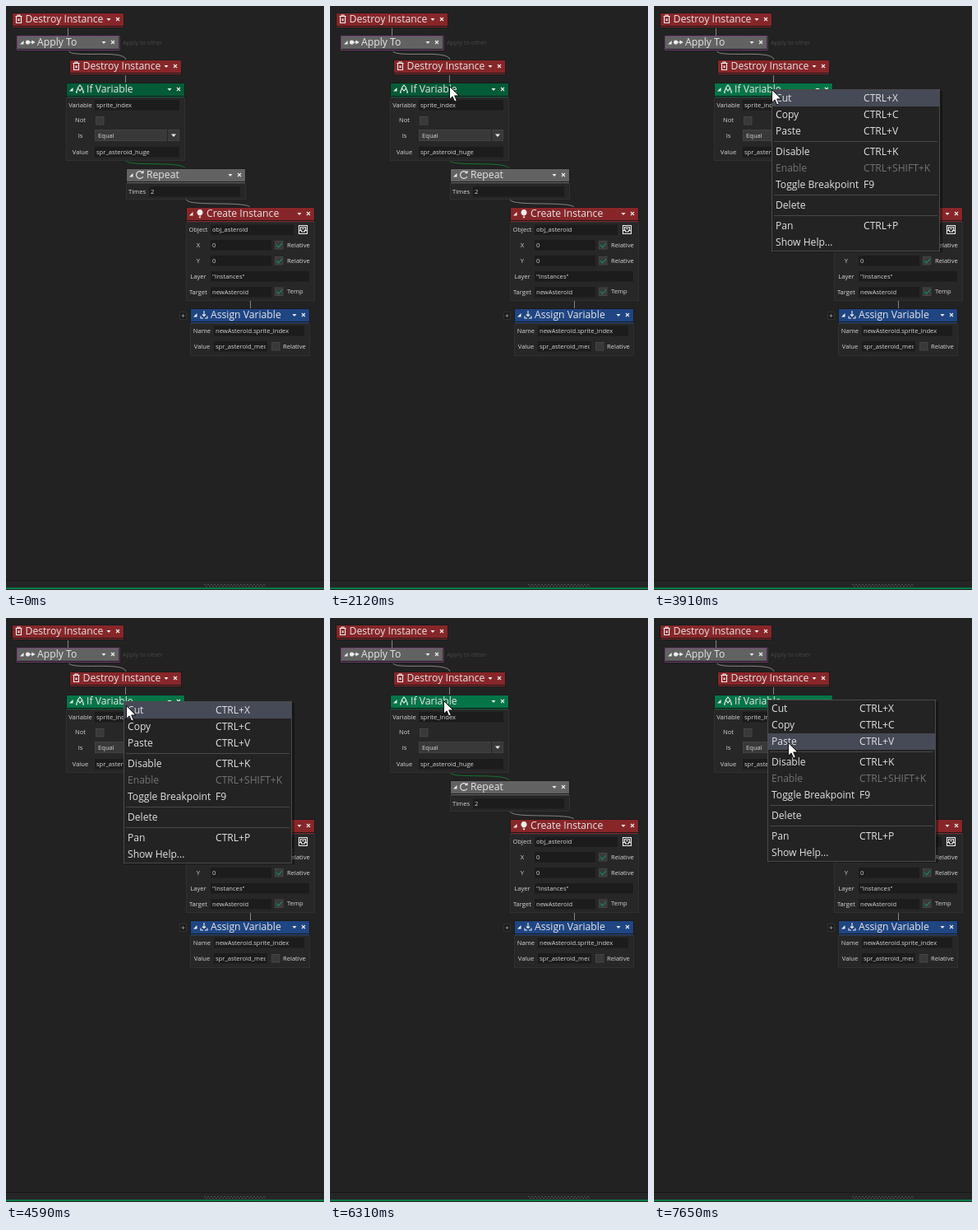
Recreate the animation shown at these times as an HTML page. Size 387 by 709 pixels, loop 8 s.

```html
<!DOCTYPE html>
<html lang="en">
<head>
<meta charset="utf-8">
<title>Visual script editor</title>
<style>
html, body { margin: 0; width: 100%; height: 100%; overflow: hidden; background: #222; }
#stage { display: block; width: 387px; height: 709px; font-family: "Open Sans", "Noto Sans", sans-serif; cursor: default; }
text { white-space: pre; }
.title { font-size: 12.2px; fill: #e6e6e6; }
.small { font-size: 7.6px; fill: #d6d6d6; }
.mid { text-anchor: middle; }
.note { font-size: 7.3px; fill: #484848; }
.item { font-size: 12.1px; fill: #e2e2e2; }
.off { fill: #737373; }
.wire { fill: none; stroke: #858585; }
.icon { fill: none; stroke: #eee; stroke-width: 1.1; }
.solid { fill: #eee; }
</style>
</head>
<body>
<svg id="stage" viewBox="0 0 387 709">
  <rect width="387" height="709" fill="#222"/>
  <g id="graph"></g>
  <rect y="697" width="387" height="12" fill="#252525"/>
  <path d="M0 697.5H387" stroke="#181818"/>
  <path d="M241 702.5H316M243 704.5H316" stroke="#505050" stroke-dasharray="2 2"/>
  <rect y="706" width="387" height="2" fill="#087b46"/>
  <g id="menu" visibility="hidden">
    <rect x="2" y="2" width="206" height="196" fill="#000" opacity=".35"/>
    <rect x=".5" y=".5" width="204" height="196" fill="#232323" stroke="#4b4b4b"/>
    <rect id="hot" x="1" width="203" height="20" fill="#464a56"/>
  </g>
  <g id="pointer" visibility="hidden">
    <path id="arrow" d="M.5 .5V16.2L4.1 12.9L6.7 19L9.3 17.9L6.7 11.9H12Z" fill="#fff" stroke="#000" stroke-width=".9"/>
    <path id="beam" d="M-3 -8H-1L0 -7L1 -8H3M0 -7V7M-3 8H-1L0 7L1 8H3" fill="none" stroke="#ddd" stroke-width="1.1"/>
  </g>
</svg>
<script>
const $ = id => document.getElementById(id);
const RED = '#872629', GREY = '#626262', GREEN = '#045c37', GREEN_LIT = '#057547', BLUE = '#1f4583';

const rect = (x, y, w, h, fill, extra = '') =>
  `<rect x="${x}" y="${y}" width="${w}" height="${h}" fill="${fill}" ${extra}/>`;
const text = (x, y, str, cls) => `<text x="${x}" y="${y}" class="${cls}">${str}</text>`;
const path = (d, cls, extra = '') => `<path d="${d}" class="${cls}" ${extra}/>`;

const icons = {
  trash: 'M-4 -3.5H4M-1.5 -3.5V-5H1.5V-3.5M-3 -3V4.5H3V-3M-1 -.5L1 2M1 -.5L-1 2',
  apply: 'M-5.5 0a2 2 0 1 0 4 0a2 2 0 1 0 -4 0M-1 0H2M2 -1.5V1.5L4.5 0Z',
  branch: 'M0 -5L2.7 -1.5L0 2L-2.7 -1.5ZM-2.5 -1L-4.5 3.5M2.5 -1L4.5 3.5M-5 4H-3M3 4H5',
  loop: 'M3.2 -3A4.4 4.4 0 1 0 3.8 2.2M4 -5V-2.3H1.3',
  bulb: 'M-1.4 1.5C-4.5 -1 -2.5 -4.5 0 -4.5S4.5 -1 1.4 1.5ZM-1.3 3H1.3M-1 4.6H1',
  assign: 'M0 -5V1.5M-2 -.5L0 1.5L2 -.5M-4 1.5V4H-1M4 1.5V4H1'
};

// x, y, w and bottom bound the dark frame; the coloured header sits one pixel inside
function node(x, y, w, bottom, color, icon, name, id = '') {
  const fold = icon !== 'trash';
  const mid = y + 8, end = x + w, ix = x + (fold ? 17 : 8.5);
  let s = rect(x, y, w, 19, '#1b1b1b');
  if (bottom > y + 20)
    s += rect(x + .5, y + 18.5, w - 1, bottom - y - 18, '#272727', 'stroke="#303030"');
  s += rect(x + 1, y + 1, w - 2, 15, color, id && `id="${id}"`) + rect(x + 1, y + 17, w - 2, 1, color);
  if (fold) s += path(`M${x + 4} ${mid + 2.5}h4.5v-4.5z`, 'solid');
  const filled = icon === 'bulb' || icon === 'apply' ? ' solid' : '';
  s += `<g transform="translate(${ix} ${mid})" class="icon">` + path(icons[icon], filled) + '</g>';
  s += text(x + (fold ? 25 : 16.5), y + 12, name, 'title');
  s += path(`M${end - 21.5} ${mid - 1}h5l-2.5 3z`, 'solid');
  return s + path(`M${end - 10} ${mid - 2}l4 4m0 -4l-4 4`, 'icon');
}

const label = (x, y, str) => text(x, y + 2.8, str, 'small mid');
const field = (x, y, w, str) => rect(x, y - 6, w, 12.5, '#1c1c1c') +
  `<svg x="${x}" y="${y - 7}" width="${w - 2}" height="14">${text(2, 9.8, str, 'small')}</svg>`;
function check(x, y, str, on) {
  let s = rect(x + .5, y - 4.5, 9.5, 9.5, '#393939', 'stroke="#454545"');
  if (on) s += path(`M${x + 2} ${y}l2.5 3l4.5 -5`, 'icon', 'style="stroke:#0b9a64"');
  return s + text(x + (on ? 15 : 14), y + 2.8, str, 'small');
}

$('graph').innerHTML = [
  path('M75.5 26V36M145.5 83V94M297.5 358V367', 'wire'),
  path('M76 54C78 64 143 52 146 65', 'wire'),
  path('M146 188C150 195 214 188 218 197', 'wire', 'style="stroke:#16752f"'),
  path('M219 235C223 244 294 236 298 245', 'wire'),

  node(7, 8, 137, 26, RED, 'trash', 'Destroy Instance'),
  node(13, 36, 125, 54, GREY, 'apply', 'Apply To'),
  path('M13.5 53.5V36.5H138V53.5Z', 'wire', 'style="stroke:#743f76"'),
  text(142, 47, 'Apply to other', 'note'),
  node(77, 65, 137, 83, RED, 'trash', 'Destroy Instance'),

  node(73, 93, 145, 187, GREEN, 'branch', 'If Variable', 'head'),
  label(90.5, 120, 'Variable'), field(108, 120, 103, 'sprite_index'),
  label(90.5, 138.5, 'Not'), check(109, 139, '', false),
  label(90.5, 157, 'Is'), rect(108.5, 150.5, 102, 13, '#393939', 'stroke="#424242"'),
  path('M196.5 150V164', 'wire', 'style="stroke:#262626"'),
  path('M201 155.5h6l-3 3.5z', 'solid'), text(112, 159.8, 'Equal', 'small'),
  label(90.5, 177, 'Value'), field(108, 177, 103, 'spr_asteroid_huge'),

  node(146, 197, 146, 234, GREY, 'loop', 'Repeat'),
  label(159.5, 225, 'Times'), field(174, 225, 111, '2'),

  node(219, 244, 157, 357, RED, 'bulb', 'Create Instance'),
  label(234, 271.5, 'Object'), field(249, 271.5, 101, 'obj_asteroid'),
  path('M356.5 266.5h10v10h-10zM358.5 272.5v-4h6v4M357 272.5h2.5v1.5h4v-1.5h2.5M360 270.5h3', 'icon'),
  label(234, 290, 'X'), field(249, 290, 74, '0'), check(327, 290, 'Relative', true),
  label(234, 309, 'Y'), field(249, 309, 74, '0'), check(327, 309, 'Relative', true),
  label(234, 328, 'Layer'), field(249, 328, 120, '"Instances"'),
  label(234, 347, 'Target'), field(249, 347, 74, 'newAsteroid'), check(327, 346.5, 'Temp', true),

  node(224, 367, 146, 424, BLUE, 'assign', 'Assign Variable'),
  rect(211.5, 371.5, 8, 9, '#1b1b1b', 'rx="1.5" stroke="#333"'),
  path('M213.5 376h4m-2 -2v4', 'wire'),
  label(238.5, 394, 'Name'), field(253, 394, 110, 'newAsteroid.sprite_index'),
  label(238.5, 413, 'Value'), field(253, 413, 65, 'spr_asteroid_medium'), check(323, 413, 'Relative', false)
].join('');

const items = [
  [10, 'Cut', 'CTRL+X'], [30, 'Copy', 'CTRL+C'], [50, 'Paste', 'CTRL+V'],
  [75, 'Disable', 'CTRL+K'], [95, 'Enable', 'CTRL+SHIFT+K', 'off'], [115, 'Toggle Breakpoint', 'F9'],
  [140, 'Delete', ''], [165, 'Pan', 'CTRL+P'], [185, 'Show Help...', '']
];
$('menu').insertAdjacentHTML('beforeend',
  path('M3 63.5H202M3 128.5H202M3 153.5H202', 'wire', 'style="stroke:#484848"') +
  items.map(([y, name, keys, cls = '']) =>
    text(5, y + 4.5, name, 'item ' + cls) + text(112, y + 4.5, keys, 'item ' + cls)).join(''));

// Pointer stops after it has reached the node header: time, x, y
const stops = [
  [2120, 145, 97], [2270, 144, 98], [2790, 143, 100], [2880, 143, 101],
  [4590, 146, 106], [4680, 154, 118], [4770, 161, 126],
  [5860, 156, 121], [5940, 148, 114], [6130, 146, 111], [6220, 141, 104], [6310, 138, 100]
];
const bezier = (a, b, c, u) => a * (1 - u) ** 2 + 2 * b * u * (1 - u) + c * u * u;

function pointerAt(t) {
  if (t < 2120) {
    const u = Math.min(9, Math.floor((t - 1240) / 87.5)) / 9;
    return [bezier(136, -40, 143, u), bezier(670, 500, 100, u)];
  }
  if (t >= 7140) {
    const u = Math.min(7, Math.floor((t - 7140) / 85) + 1) / 7;
    const e = u * u * (3 - 2 * u);
    return [138 + 25 * e, 100 + 51 * e];
  }
  return stops.filter(s => s[0] <= t).pop().slice(1);
}

const show = (id, on) => $(id).setAttribute('visibility', on ? 'visible' : 'hidden');

function draw(t) {
  const [x, y] = pointerAt(t);
  const second = t >= 6770, open = second || (t >= 3910 && t < 5390);
  const beam = t >= 5300 && t < 5940, shown = t >= 1240;
  show('pointer', shown);
  show('arrow', shown && !beam);
  show('beam', beam);
  $('pointer').setAttribute('transform', `translate(${x} ${y})`);
  $('head').setAttribute('fill', t < 2700 ? GREEN : GREEN_LIT);

  const mx = second ? 138 : 143, my = second ? 99 : 101;
  show('menu', open);
  show('hot', open && !(second && t < 7140));
  $('menu').setAttribute('transform', `translate(${mx} ${my})`);
  $('hot').setAttribute('y', 1 + 20 * Math.max(0, Math.floor((y - my - 1) / 20)));
}

const start = performance.now();
function tick() {
  draw((performance.now() - start) % 8000);
  requestAnimationFrame(tick);
}
tick();
</script>
</body>
</html>
```
